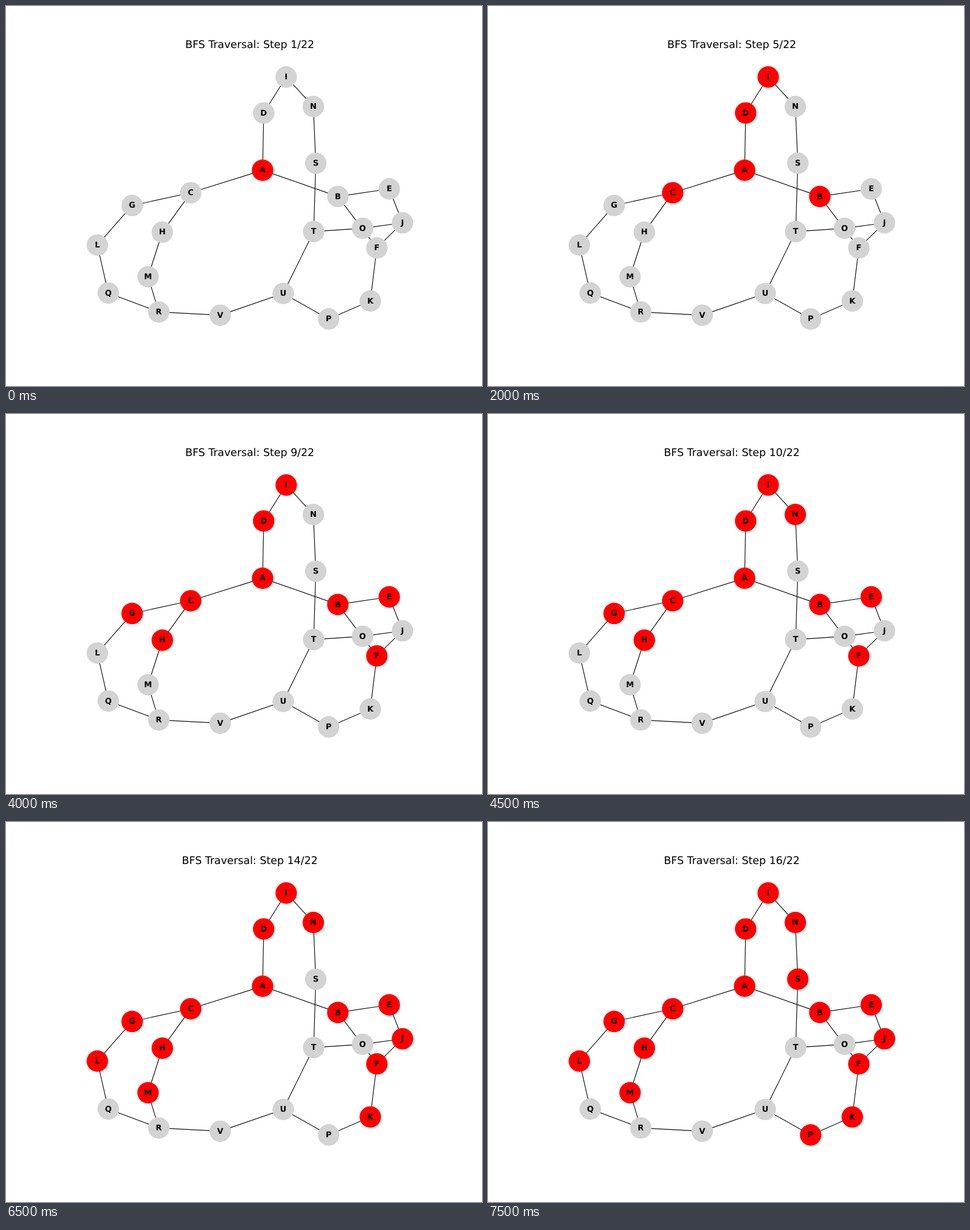
Write an HTML page that moves like this. It is 837 px wide and 669 px high and loops after 8000 ms.

```html
<!DOCTYPE html>
<html lang="en">
<head>
<meta charset="utf-8">
<title>BFS Traversal</title>
<style>
  html, body { margin: 0; width: 100%; height: 100%; overflow: hidden; background: #fff; }
  svg { display: block; width: 837px; height: 669px; }
  text { font-family: "DejaVu Sans", sans-serif; text-anchor: middle; text-rendering: geometricPrecision; }
  .title { font-size: 18.6px; }
  .label { font-size: 13.95px; font-weight: bold; }
  line { stroke: #000; stroke-width: 1.16; }
</style>
</head>
<body>
<svg viewBox="0 0 837 669"></svg>
<script>
const STEP_MS = 500;
const LOOP_MS = 8000;
const RADIUS = 18.9;
const VISIT_ORDER = "ADBCIFEGHNKJLMSP";
const EDGES = "AB AC AD BE BF CG CH DI EJ FJ FK GL HM IN JO KP LQ MR NS OT PU QR RV ST TU UV";
const NODES = {
  A: [451.2, 289.1], B: [583.5, 335.4], C: [324.8, 328.8], D: [453.1, 188.3],
  E: [673.9, 322], F: [652.1, 425.9], G: [221.8, 351.2], H: [274.9, 398.2],
  I: [492.7, 125], J: [697.2, 381.7], K: [640.6, 519.3], L: [160.6, 420.9],
  M: [249.8, 476.6], N: [540.4, 176.9], O: [627, 391.4], P: [567.3, 551],
  Q: [179.9, 505.3], R: [268.7, 538.6], S: [544.8, 276.7], T: [541, 397.2],
  U: [487.4, 506.1], V: [376.7, 544.4]
};

const svg = document.querySelector("svg");

function add(tag, attributes, content = "") {
  const element = document.createElementNS("http://www.w3.org/2000/svg", tag);
  for (const [name, value] of Object.entries(attributes)) element.setAttribute(name, value);
  element.textContent = content;
  return svg.appendChild(element);
}

const title = add("text", { class: "title", x: 428.7, y: 74.2 });

for (const [from, to] of EDGES.split(" ")) {
  const [x1, y1] = NODES[from];
  const [x2, y2] = NODES[to];
  add("line", { x1, y1, x2, y2 });
}

const circles = {};
for (const [name, [cx, cy]] of Object.entries(NODES)) {
  circles[name] = add("circle", { cx, cy, r: RADIUS });
}
for (const [name, [x, y]] of Object.entries(NODES)) {
  add("text", { class: "label", x, y: y + 4.2 }, name);
}

let shownStep = 0;

function render(time) {
  const step = Math.floor((time % LOOP_MS) / STEP_MS) + 1;
  if (step === shownStep) return;
  shownStep = step;
  const visited = VISIT_ORDER.slice(0, step);
  title.textContent = `BFS Traversal: Step ${step}/${Object.keys(NODES).length}`;
  for (const name in circles) {
    circles[name].setAttribute("fill", visited.includes(name) ? "#ff0000" : "#d3d3d3");
  }
}

const start = performance.now();
function tick() {
  render(performance.now() - start);
  requestAnimationFrame(tick);
}
tick();
</script>
</body>
</html>
```
